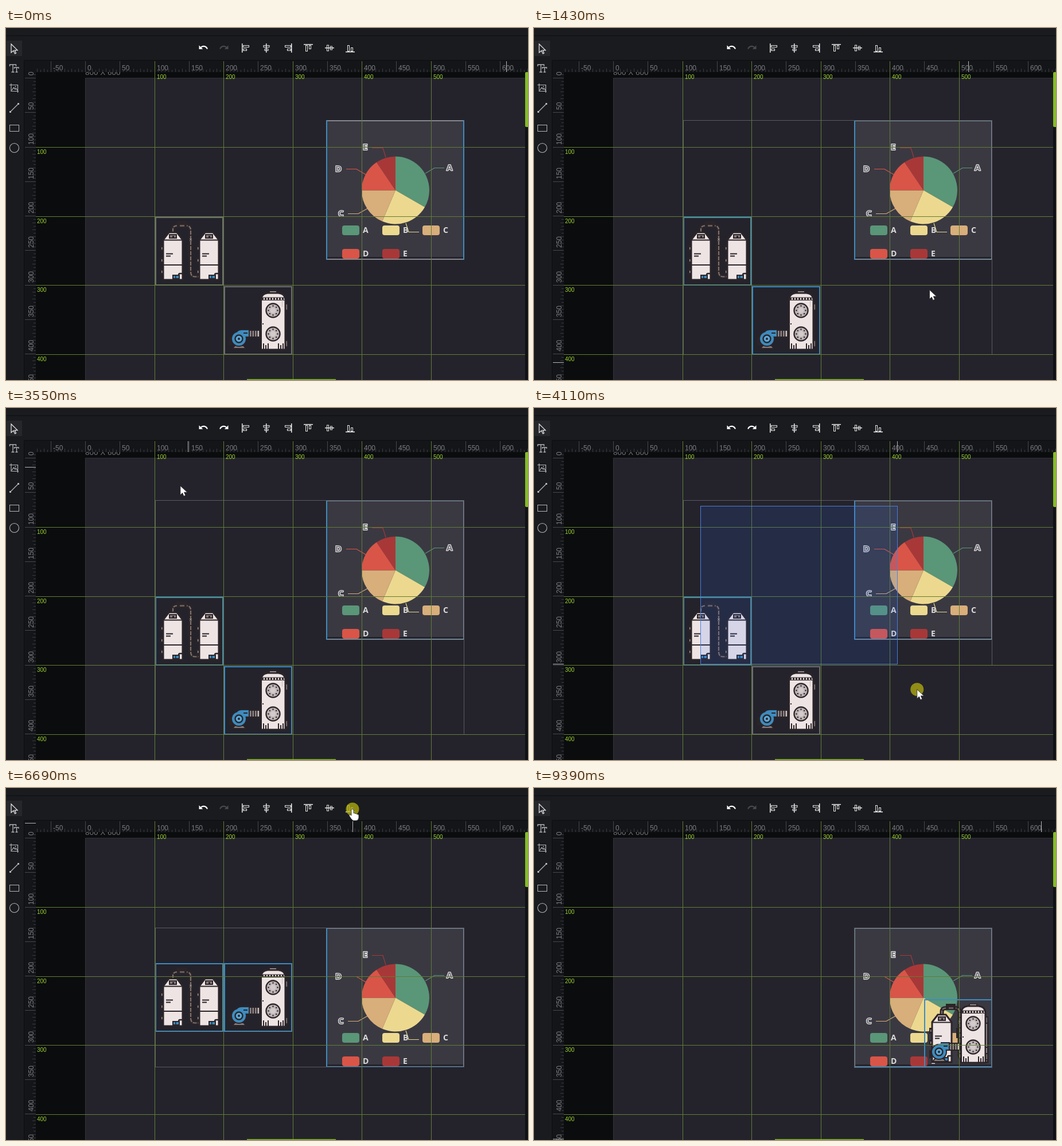
Animation of 910 by 615 pixels, one loop 9.6 s. Source, as an HTML page with a canvas:

```html
<!DOCTYPE html>
<html lang="en">
<head>
<meta charset="utf-8">
<title>Aligning objects in an editor</title>
<style>
html, body { margin: 0; width: 100%; height: 100%; overflow: hidden; background: #0b0c0e; }
canvas { display: block; }
</style>
</head>
<body>
<canvas id="stage" width="910" height="615"></canvas>
<script>
const g = document.getElementById('stage').getContext('2d');
const LOOP = 9600, UNIT = 1.205, LEFT = 138.5, TOP = 87.5;
const SANS = '"Liberation Sans", Arial, sans-serif', HUMAN = '"Open Sans", "Noto Sans", sans-serif';
const BLUE = '#3d8cc0', MIX = '#728794', GRAY = '#6d6d70', DARK = '#2b2428', CREAM = '#eee4e4';
const SLICES = [['A', 120, '#5a9678'], ['B', 83, '#ecd98f'], ['C', 67, '#d8ae7a'], ['D', 56, '#d95548'], ['E', 34, '#a83838']];

// The screen updates in steps, counted from the start of each burst of movement
const BURSTS = [0, 130, 1160, 2870, 3900, 4870, 5360, 6090, 6690, 7290, 8660, 9260], STEP = 68.5;

// Pointer path: time, x, y
const PATH = [
  [130, 380, 26], [340, 268, 190], [400, 268, 190], [600, 630, 440], [745, 706, 525], [815, 721, 541],
  [1090, 758, 572], [1230, 762, 594], [1290, 762, 594], [1580, 484, 70], [1720, 454, 34],
  [2865, 454, 34], [2870, 437, 30], [3075, 344, 35], [3275, 344, 35], [3560, 290, 171], [3640, 290, 171],
  [3900, 520, 330], [4036, 633, 447], [4106, 668, 492], [4250, 740, 592], [4330, 740, 592],
  [4652, 628, 93], [4722, 622, 84], [4870, 622, 80], [5200, 564, 37], [6090, 564, 37], [6290, 585, 48],
  [6440, 604, 37], [7290, 604, 37], [7640, 491, 34], [8660, 491, 34], [8860, 884, 375], [9230, 884, 375], [9250, 884, 613]
];
const DRAGS = [[400, 1230, 268, 190], [3640, 4260, 290, 171]];
const CLICKS = [[1900, 2050], [3140, 3270], [5360, 5560], [6690, 6820], [7840, 7980]];

// Object corners after each command: chart, tanks, column
const BASE = [[558, 161], [260, 330], [380, 451]];
const MIDDLE = [[558, 244], [260, 306], [380, 306]];
const LAYOUTS = [
  [0, BASE], [1990, [[409, 161], [470, 330], [470, 451]]], [3210, BASE], [5490, MIDDLE],
  [6820, [[558, 244], [260, 369], [380, 369]]], [7930, [[558, 244], [680, 369], [680, 369]]]
];
const SIZES = [[241, 244], [119, 120], [119, 120]];

function rect(x, y, w, h, color) { g.fillStyle = color; g.fillRect(x, y, w, h); }
function path(d, stroke, width = 1, fill) {
  const p = new Path2D(d);
  if (fill) { g.fillStyle = fill; g.fill(p); }
  if (stroke) { g.strokeStyle = stroke; g.lineWidth = width; g.stroke(p); }
}
function disc(x, y, r, fill, stroke, width = 1) {
  g.beginPath(); g.arc(x, y, r, 0, 7);
  if (fill) { g.fillStyle = fill; g.fill(); }
  if (stroke) { g.strokeStyle = stroke; g.lineWidth = width; g.stroke(); }
}
function text(s, x, y, color, font) { g.fillStyle = color; g.font = font; g.fillText(s, x, y); }
function outline(x, y, w, h, color) { g.strokeStyle = color; g.lineWidth = 1; g.strokeRect(x + .5, y + .5, w, h); }
function at(x, y, draw, sx = 1, sy = sx) { g.save(); g.translate(x, y); g.scale(sx, sy); draw(); g.restore(); }
function edges(x, y, [w, h], [top, right, bottom, left]) {
  rect(x, y, w, 2, top); rect(x, y + h - 2, w, 2, bottom);
  rect(x, y, 2, h, left); rect(x + w - 2, y, 2, h, right);
}

function pointer(t) {
  let i = PATH.findIndex(k => k[0] > t);
  if (i < 0) i = PATH.length;
  const a = PATH[Math.max(i - 1, 0)], b = PATH[Math.min(i, PATH.length - 1)];
  const k = b[0] > a[0] ? (t - a[0]) / (b[0] - a[0]) : 0;
  return [a[1] + (b[1] - a[1]) * k, a[2] + (b[2] - a[2]) * k];
}

function drawChart() {
  rect(0, 0, 241, 244, '#3a3942');
  rect(2, 239, 237, 3, '#24232c');
  let a = -Math.PI / 2;
  for (const [, deg, color] of SLICES) {
    const b = a + deg * Math.PI / 180;
    g.beginPath(); g.moveTo(121, 122.5); g.arc(121, 122.5, 59, a, b);
    g.fillStyle = color; g.fill();
    a = b;
  }
  const leaders = ['M206 83.5H189L173 93', 'M162 195.5H144L139 180', 'M38 163.5H56L72 154.5', 'M35 85.5H53L69 95', 'M80 48.5H99L104 65'];
  leaders.forEach((d, i) => path(d, SLICES[i][2], 1.2));
  const tags = [['A', 210, 88], ['C', 21, 168], ['D', 16, 90], ['E', 64, 52]];
  for (const [s, x, y] of tags) {
    g.font = 'bold 15px ' + HUMAN;
    g.strokeStyle = '#e4e4e4'; g.lineWidth = 2.2; g.lineJoin = 'round';
    g.strokeText(s, x, y);
    text(s, x, y, '#77767c', g.font);
  }
  SLICES.forEach(([s, , color], i) => {
    const x = 28 + i % 3 * 70, y = i < 3 ? 184 : 225;
    g.beginPath(); g.roundRect(x, y, 30, 17, 4); g.fillStyle = color; g.fill();
    text(s, x + 36, y + 13, '#dadada', 'bold 14px ' + HUMAN);
  });
}

function drawTank(x) {
  at(x, 0, () => {
    for (const y of [50, 71, 91]) {
      rect(-5, y, 6, 10, DARK);
      rect(-3, y + 3, 2, 4, '#9a8f8f');
    }
    path('M0 40L10 27H24L34 40V110H0Z', DARK, 3, CREAM);
    path('M0 40.5H34M0 84H34', DARK, 2.2);
    path('M5 64.5H17M5 68.5H13', DARK, 2);
    path('M11 37V31H23V37Z', DARK, 2, '#877d7d');
    rect(16, 33, 3, 3, DARK);
    path('M35 99H29Q27 99 27 102V104', DARK, 2.5);
    rect(16, 101, 13, 8, DARK);
    rect(18, 103, 9, 4, BLUE);
    rect(21, 103, 1.5, 4, DARK);
  });
}

function drawTanks() {
  const pipe = 'M31 27V22Q31 15.5 38 15.5H54Q62 15.5 62 23V96Q62 104.5 69 104.5H76';
  path(pipe, DARK, 7);
  g.setLineDash([7, 2]); path(pipe, '#7c716b', 2.2); g.setLineDash([]);
  rect(38, 8, 17, 11, DARK);
  rect(43, 14, 8, 3, '#665c58');
  rect(56, 50, 5, 18, DARK);
  path('M60 38l4 4m0-4l-4 4', '#a39a96', 1);
  drawTank(14);
  drawTank(77);
}

function drawVent(y) {
  disc(85.5, y, 12, '#bdb4b5', DARK, 2.4);
  disc(85.5, y, 5, '#d2cacb');
  for (let i = 0; i < 8; i++) {
    const a = i * Math.PI / 4;
    disc(85.5 + 8 * Math.cos(a), y + 8 * Math.sin(a), 1.2, DARK);
  }
}

function drawColumn() {
  path('M106 31V42H111V31ZM106 95V106H111V95Z', DARK, 2, '#877d7d');
  rect(78, 8, 15, 4, DARK);
  rect(80, 9, 11, 2, '#aaa1a1');
  path('M64.5 23Q66 13 76 12H95Q106 13 107 23V111H64.5Z', DARK, 3, CREAM);
  path('M65 20H107M65 24.5H107', DARK, 1);
  g.setLineDash([3, 2]); path('M66 22H106', DARK, 3.5); g.setLineDash([]);
  drawVent(42.5);
  drawVent(83.5);
  rect(67, 65, 2, 2, DARK);
  rect(101, 24, 1, 12, '#c5bcbc');
  for (const [x, h] of [[68, 10], [72, 7], [76, 10], [94, 10], [98, 7], [102, 10]]) rect(x, 110 - h, 2, h, DARK);
  // Blower and its duct
  rect(43, 76, 21, 14, DARK);
  for (let x = 45; x < 63; x += 4.5) rect(x, 78, 2.6, 10, x > 57 ? '#c9c0c0' : '#8f8585');
  path('M19 104L15 109H38L34 104Z', DARK, 2, '#857a78');
  rect(9, 89, 6, 14, DARK);
  disc(26, 92, 14, DARK);
  rect(29, 75, 16, 15, DARK);
  disc(26, 92, 12, BLUE);
  path('M23 80Q26 77 31 77H43V88H33Z', null, 0, BLUE);
  rect(34, 81, 7, 2, DARK);
  disc(26, 92, 6.5, '#5aa7d6', DARK, 2.4);
  disc(26, 92, 2, DARK);
}

function drawGuides() {
  for (let n = 100; n <= 500; n += 100) {
    const x = Math.floor(LEFT + n * UNIT), y = Math.round(TOP + n * UNIT);
    rect(x, 58, 1, 557, '#617d33');
    text(n, x + 4, 89, '#9bd22d', '10px ' + SANS);
    if (n < 500) {
      rect(52, y, 858, 1, '#617d33');
      text(n, 54, y + 12, '#9bd22d', '10px ' + SANS);
    }
  }
}

function drawRulers() {
  rect(32, 57, 878, 20, '#141518');
  rect(32, 57, 20, 558, '#141518');
  g.save();
  g.beginPath(); g.rect(52, 58, 858, 19); g.rect(33, 76, 19, 539); g.clip();
  for (let n = -70; n <= 640; n += 5) {
    const major = n % 50 === 0, len = major ? 19 : n % 10 ? 4 : 6, color = major ? '#46474b' : '#3a3b3f';
    const x = Math.floor(LEFT + n * UNIT), y = Math.floor(TOP + n * UNIT);
    rect(x, 77 - len, 1, len, color);
    rect(52 - len, y, len, 1, color);
    if (!major) continue;
    text(n, x + 4, 73.5, '#7b7c80', '12px ' + SANS);
    at(48, y - 4, () => { g.rotate(-Math.PI / 2); text(n, 0, 0, '#7b7c80', '12px ' + SANS); });
  }
  g.restore();
}

function drawAlign(x, mode) {
  // mode 0 start, 1 centre, 2 end
  const bars = [[10, -4], [6, 2]];
  rect([-7, -1, 6][mode] + x, -8, 1.5, 16, '#e6e6e6');
  for (const [w, y] of bars) outline(x + [-5, -w / 2 - .5, 5 - w][mode], y - 1, w, 3, '#e6e6e6');
}

function drawTools(redo) {
  rect(0, 0, 910, 57, '#1a1b1e');
  rect(0, 13, 910, 1, '#0c0d0f');
  rect(32, 56, 878, 1, '#0c0d0f');
  rect(0, 14, 32, 601, '#1a1b1e');
  rect(31, 57, 1, 558, '#0c0d0f');
  const arrow = 'M2 7V16H11L7.5 12.5Q10 10.6 13 10.6Q18 11 20 16L22.5 15Q20 8 13 7.8Q9 7.8 5.6 10.6Z';
  at(335, 25, () => path(arrow, null, 0, '#fff'), .75);
  at(389, 25, () => path(arrow, null, 0, redo ? '#fff' : '#48494d'), -.75, .75);
  at(0, 35, () => [418, 454, 491].forEach(drawAlign));
  [527, 564, 600].forEach((x, i) => at(x, 35, () => { g.rotate(Math.PI / 2); g.scale(1, -1); drawAlign(0, i); }));

  rect(1, 22, 27, 27, '#26272b');
  path('M9 28V43L13 39.5L15.5 45L17.5 44L15.2 38.8H20Z', '#eee', 1.2);
  path('M6.5 67V64H17.5V67M12 64V77M9.5 77H14.5M14.5 71V69H22V71M18.5 69V77M16.5 77H20.5', '#b4b5b8', 1.3);
  path('M9 97V110.5H22M6 99.5H20.5V113M10 109L13.5 104L16 107L17.5 105.5L20 109', '#b4b5b8', 1.2);
  disc(16.5, 102.5, 1, '#b4b5b8');
  path('M8 146L21 133', '#b4b5b8', 1.2);
  rect(6, 145, 3, 3, '#b4b5b8');
  rect(20, 131, 3, 3, '#b4b5b8');
  outline(6, 169, 16, 11, '#b4b5b8');
  disc(14.5, 209.5, 8, null, '#b4b5b8', 1.1);
}

function drawPointer(t, [x, y]) {
  if (CLICKS.concat(DRAGS).some(([a, b]) => t >= a && t < b)) disc(x, y, 11.5, 'rgba(175,170,15,.78)');
  const hand = y < 52 && x > 330 && x < 616;
  at(x, y, () => hand
    ? path('M-2 1Q0-2 2 1V7Q4 6 5 8Q7 7 8 9Q11 8 11 11V15Q10 20 7 20H1Q-2 18-6 11Q-5 8-2 11Z', '#222', .8, '#fff')
    : path('M0 0V16L3.7 12.5L6 18L9 16.7L6.6 11.3H12Z', '#222', .8, '#fff'));
}

function draw(t) {
  const places = LAYOUTS.filter(l => l[0] <= t).pop()[1];
  const drag = DRAGS.find(([a, b]) => t >= a && t < b);
  const late = pointer(t - 70);
  let marquee = null, chosen = places.map((_, i) => t >= 400 || i === 0);
  if (drag) {
    const [start, , x, y] = drag, end = t - 70 < start ? [x, y] : late;
    marquee = [x, y, end[0] - x, end[1] - y];
    chosen = places.map(([px, py], i) => end[0] > px && end[1] > py && x < px + SIZES[i][0] && y < py + SIZES[i][1]);
  }

  rect(0, 0, 910, 615, '#0b0c0e');
  text('800 X 600', 138, 82, '#6f7074', '13.5px ' + SANS);
  rect(138, 88, 767, 527, '#24232c');
  outline(138, 87, 767, 540, '#323238');

  [drawChart, drawTanks, drawColumn].forEach((paint, i) => {
    const [x, y] = places[i];
    at(x, y, paint);
    let colors = [GRAY, GRAY, GRAY, GRAY];
    if (t < 400 && i === 0) colors = ['#85878e', BLUE, '#85878e', BLUE];
    else if (chosen[i]) colors = i ? [BLUE, '#4a86ad', '#4a86ad', BLUE]
      : [MIX, MIX, t > 5490 ? '#4a86ad' : MIX, x < 500 || t > 7930 ? MIX : BLUE];
    edges(x, y, SIZES[i], colors);
  });

  if (t >= 400 && chosen.some(Boolean)) {
    const hit = places.map((p, i) => [...p, p[0] + SIZES[i][0], p[1] + SIZES[i][1]]).filter((_, i) => chosen[i]);
    const [x, y] = [0, 1].map(k => Math.min(...hit.map(h => h[k])));
    const [r, b] = [2, 3].map(k => Math.max(...hit.map(h => h[k])));
    outline(x, y, r - x - 1, b - y - 1, '#5b5a60');
  }

  drawRulers();
  drawGuides();
  if (marquee) {
    g.fillStyle = 'rgba(40,110,255,.12)';
    g.fillRect(...marquee);
    outline(...marquee.map(Math.round), '#4a7fe0');
  }

  // Pointer marks in the rulers
  let markX = late[0], markY = Math.max(late[1], 61);
  if (t < 200) [markX, markY] = [872, 700];
  else if (t > 1650 && t < 2940) markX = 484;
  rect(Math.round(markX), 58, 1, 19, '#b5b5b5');
  rect(33, Math.round(markY), 19, 1, '#b5b5b5');

  drawTools(t >= 3210 && t < 5490);
  rect(905, 77, 5, 538, '#111215');
  g.beginPath(); g.roundRect(905, 77, 6, 96, 2); g.fillStyle = '#86bc25'; g.fill();
  rect(420, 613.5, 155, 2, '#86bc25');
  if (t >= 130 && t < 9320) drawPointer(t, pointer(t));
}

const begin = performance.now();
function tick(now) {
  const t = Math.max(0, now - begin) % LOOP;
  const start = BURSTS.filter(b => b <= t).pop();
  draw(start + STEP * Math.floor((t - start) / STEP));
  requestAnimationFrame(tick);
}
requestAnimationFrame(tick);
</script>
</body>
</html>
```
